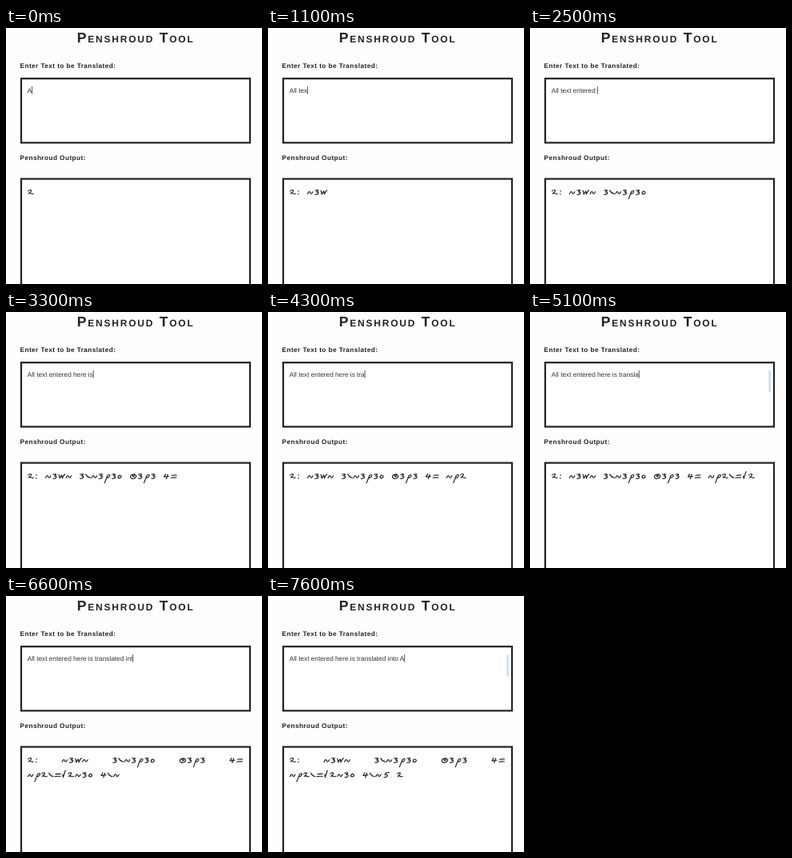
An HTML page for the animation above (8 s loop, 320 by 320 pixels).

```html
<!DOCTYPE html>
<html lang="en">
<head>
<meta charset="utf-8">
<title>Penshroud Tool</title>
<style>
html, body { margin: 0; width: 100%; height: 100%; overflow: hidden; background: #fefefe; }
svg { display: block; width: 100vw; height: 100vh; }
text { font-family: "Liberation Sans", Arial, sans-serif; fill: #222; white-space: pre; text-rendering: geometricPrecision; }
.title { font-size: 17.6px; font-weight: bold; font-variant: small-caps; letter-spacing: .1em; text-anchor: middle; }
.label { font-size: 8.25px; font-weight: bold; letter-spacing: .42px; }
#typed { font-size: 8.26px; fill: #333; }
.box { fill: #fff; stroke: #222; stroke-width: 2.2; }
#script { fill: none; stroke: #1c1c1c; stroke-width: 1.15; stroke-linecap: round; stroke-linejoin: round; }
</style>
</head>
<body>
<svg viewBox="0 0 320 320">
  <text class="title" x="162.2" y="18">Penshroud Tool</text>
  <text class="label" x="17.5" y="50.3">Enter Text to be Translated:</text>
  <rect class="box" x="19" y="63.2" width="286" height="80.2"/>
  <text id="typed" x="26.7" y="80.6"></text>
  <rect id="caret" y="73" width=".8" height="9.6" fill="#333"/>
  <rect id="bar" x="298.3" y="73.2" width="2.6" height="27.6" rx=".8" fill="#c9e0f4"/>
  <text class="label" x="17.5" y="165.3">Penshroud Output:</text>
  <rect class="box" x="19" y="188.6" width="286" height="150"/>
  <g id="script"></g>
</svg>
<script>
const LOOP = 8000, LEFT = 27, RIGHT = 297, SPACE = 8.2, BASE = 208, LINE = 18.4;
const $ = id => document.getElementById(id);
const typed = $('typed'), caret = $('caret'), bar = $('bar'), script = $('script');

// letter: [advance, stroke path relative to the baseline]
const glyphs = {
  a: [9, 'M.7-4.2Q2.6-6.2 4.5-5.2Q4.8-3.6 1.3-1Q3-2 4.3-1.1T7.3-1'],
  ':': [4.8, 'M1.9-4.3l.5 .3M1.6-.5l.5 .3'],
  l: [7.6, 'M1.2-3L1.8 .2Q3.2-4 4.6-8.4'],
  t: [8.5, 'M.5-.6Q2.2-4.8 3.6-2.6Q4.8 1.4 7-3.3'],
  e: [7.8, 'M1.4-5Q4.6-6 5.3-5L3-3.1Q6.4-3 5.2-1Q3.8 .6 1.3 .1'],
  x: [9.3, 'M.9-4.8L1.9-.1L4.4-4.2L5.2-.1Q6.8-4.6 8.5-5.1'],
  n: [7.4, 'M.6-5.2Q2.2-1.6 6.3-.7'],
  r: [8.5, 'M.4 5.6Q2.2 1.2 4.1-3.8Q7.6-5.6 6.9-2.8Q5.6-.4 3-.9'],
  d: [7.3, 'M2.8-4Q.4-2.6 1.2-.8Q3.6 .4 5-1.8Q5-4.2 2.8-4'],
  h: [9.7, 'M6-4.9Q1.6-5.6 .9-2.4Q1 .5 4.5 .3Q8.6-.6 8-3.5Q6.8-6 4.4-4.6Q3-2.6 4.4-2.1Q6-2.4 6-4.6'],
  i: [8.8, 'M3-5.4L1-2.1Q3.5-1.9 6.9-2.7M5.6-5L3.8 .5'],
  s: [9.2, 'M1.6-3.8Q4.6-4.2 7.8-4M.8-.8Q4-1.3 7.6-1'],
  o: [10, 'M8.6-5.8L4.6-5.3L3.4-3Q7.4-3.4 6.6-1.2Q5 .6 2.4 .1']
};

// [time, keys ("<" deletes), scrollbar shown]
const keys = [
  [0, 'A', 0], [200, 'l', 1], [300, 'l', 0], [400, ' ', 1], [600, 't', 0], [700, 'e', 1],
  [1100, 'x', 0], [1200, 't', 1], [1300, ' ', 0], [1500, 'e', 1], [1600, 'n', 0],
  [1800, 't', 1], [1900, 'e', 0], [2100, 'r', 1], [2200, 'e', 1], [2500, 'd ', 0],
  [2700, 'h', 1], [2900, 'er', 0], [3100, 'e ', 0], [3300, 'is', 0], [3400, ' ', 1],
  [3500, 't', 0], [3600, 'r', 1], [3800, 'a', 0], [3900, 's', 1], [4300, '<', 0],
  [4400, '', 1], [4600, 'n', 0], [4700, 's', 1], [5000, 'l', 0], [5100, 'a', 1],
  [5300, 't', 0], [5400, 'e', 1], [5600, 'd', 0], [5700, ' ', 0], [6300, 'i', 1],
  [6400, 'n', 1], [6600, 't', 0], [6700, 'o', 1], [6900, ' ', 0], [7600, 'A', 1]
];

const wordWidth = word => [...word].reduce((w, c) => w + glyphs[c][0], 0);

function layout(text) {
  const lines = [{ words: [], width: 0 }];
  for (const word of text.toLowerCase().replace('ll', ':').split(' ').filter(Boolean)) {
    const width = wordWidth(word);
    let line = lines[lines.length - 1];
    if (LEFT + line.width + line.words.length * SPACE + width > RIGHT) {
      lines.push(line = { words: [], width: 0 });
    }
    line.words.push(word);
    line.width += width;
  }
  return lines;
}

function drawScript(text) {
  const lines = layout(text);
  let out = '';
  lines.forEach((line, row) => {
    const full = row < lines.length - 1;   // wrapped lines are justified
    const gap = full ? (RIGHT - LEFT - line.width) / (line.words.length - 1) : SPACE;
    let x = LEFT;
    for (const word of line.words) {
      for (const c of word) {
        const [advance, path] = glyphs[c];
        out += `<path transform="translate(${x} ${BASE + row * LINE})" d="${path}"/>`;
        x += advance;
      }
      x += gap;
    }
  });
  script.innerHTML = out;
}

let shown = null;
function render(t) {
  let text = '', bars = 0;
  for (const [time, key, on] of keys) {
    if (time > t) break;
    text = key === '<' ? text.slice(0, -1) : text + key;
    bars = on;
  }
  if (text !== shown) {
    shown = text;
    typed.textContent = text;
    caret.setAttribute('x', 26.7 + typed.getComputedTextLength());
    drawScript(text);
  }
  const blink = (t >= 6200 && t < 6300) || (t >= 7400 && t < 7600);
  caret.setAttribute('opacity', blink ? 0 : 1);
  bar.setAttribute('opacity', bars);
}

const start = performance.now();
function tick() {
  render((performance.now() - start) % LOOP);
  requestAnimationFrame(tick);
}
tick();
</script>
</body>
</html>
```
